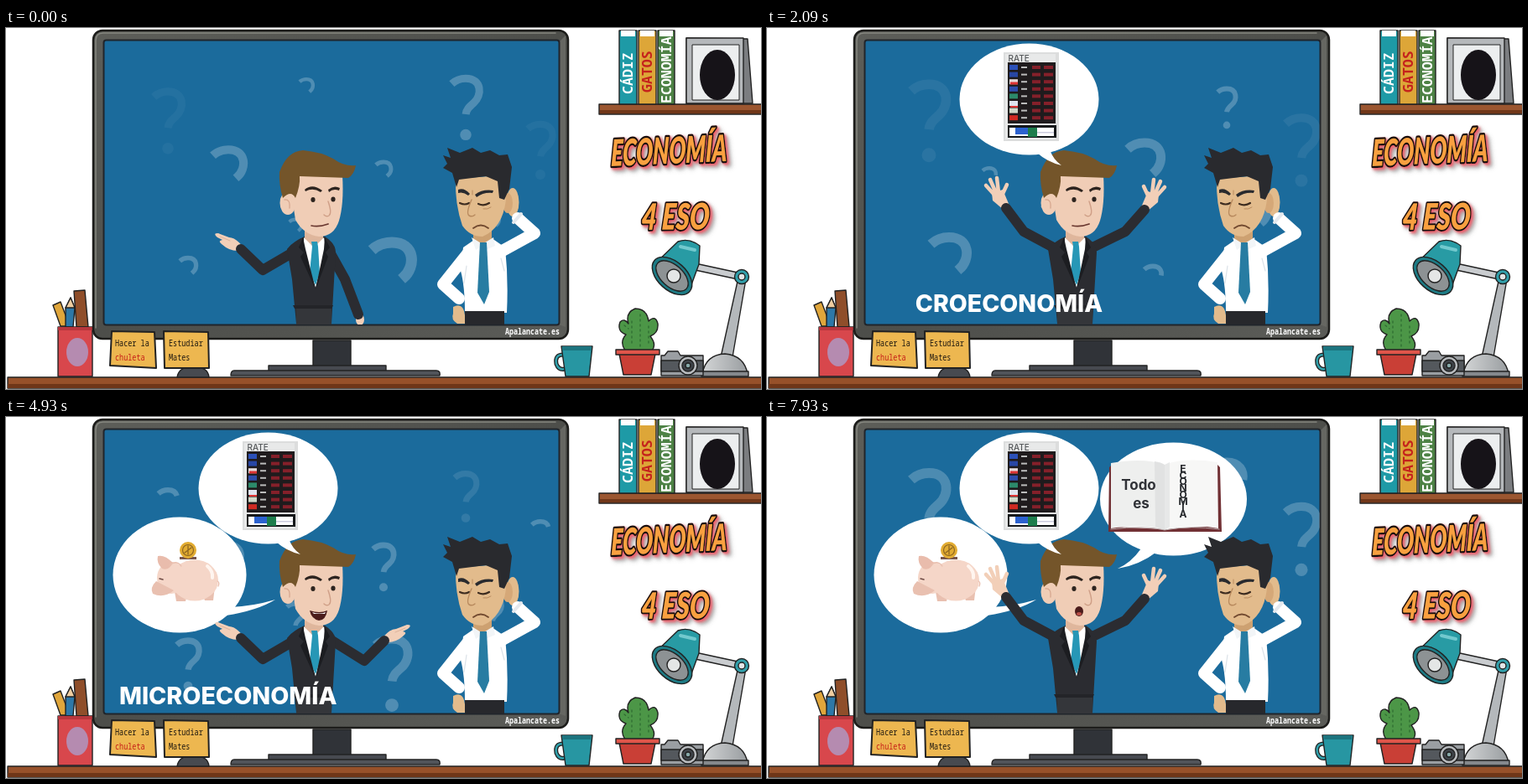
Write an HTML page that moves like this. It is 900 by 431 pixels and loops after 8000 ms.

```html
<!DOCTYPE html>
<html lang="es">
<head>
<meta charset="utf-8">
<title>Economía 4 ESO</title>
<style>
html, body { margin: 0; width: 100%; height: 100%; overflow: hidden; background: #fff; }
svg { display: block; width: 100%; height: 100%; }
.mono { font-family: "Noto Sans Mono", "DejaVu Sans Mono", monospace; }
.sans { font-family: Inter, "Open Sans", sans-serif; font-weight: 700; }
.logo { font: italic 900 26.5px Lato, sans-serif; fill: #f9a03f; stroke: #17110d; stroke-width: 2.8; paint-order: stroke; stroke-linejoin: round; }
.logo.big { font-size: 31px; }
.ink { stroke: #222; stroke-width: 1.4; stroke-linejoin: round; }
.ink.thick { stroke-width: 2; }
.line { fill: none; stroke-linecap: round; stroke-linejoin: round; }
</style>
</head>
<body>
<svg viewBox="0 0 900 431" preserveAspectRatio="none">
<defs>
  <linearGradient id="bezel" x2="1" y2="1"><stop stop-color="#5d5e59"/><stop offset=".5" stop-color="#4d4e4a"/><stop offset="1" stop-color="#5b5c58"/></linearGradient>
  <linearGradient id="metal" x2="1"><stop stop-color="#d3d5d6"/><stop offset="1" stop-color="#999da0"/></linearGradient>
  <filter id="glow" x="-20%" y="-40%" width="150%" height="200%"><feDropShadow dx="2" dy="2" stdDeviation="1.5" flood-color="#ef5e6c"/><feDropShadow dx="3" dy="3" stdDeviation="2" flood-color="#555" flood-opacity=".55"/></filter>
  <clipPath id="view"><rect x="118" y="16" width="541" height="338"/></clipPath>
</defs>
<rect width="900" height="431" fill="#fff"/>

<!-- shelf -->
<g class="ink">
  <path d="M707 91H902V103H707Z" fill="#9b5630"/><path d="M708 98H900V102H708Z" fill="#713719" stroke="none"/>
  <path d="M731 3H752V91H731Z" fill="#1e9aa6"/><path d="M754 3H775V91H754Z" fill="#dda638"/><path d="M777 3H797V91H777Z" fill="#4d8245"/>
  <path d="M733 3H750V10H733ZM756 3H773V10H756ZM779 3H795V10H779Z" fill="#fff" stroke="none"/>
  <path d="M811 12L884 13L890 90H811Z" fill="#7b7d80"/>
  <path d="M811 12H879V90H811Z" fill="#b5b8bb"/><path d="M818 20H874V86H818Z" fill="#eceeef" stroke-width="1"/>
</g>
<ellipse cx="848" cy="56" rx="21" ry="30" fill="#161318"/>
<g class="mono" font-size="16.6" font-weight="600">
  <text transform="translate(747 79) rotate(-90)" fill="#fff">CÁDIZ</text>
  <text transform="translate(770 77) rotate(-90)" fill="#c5221c">GATOS</text>
  <text transform="translate(793 90) rotate(-90)" fill="#fff">ECONOMÍA</text>
</g>
<g filter="url(#glow)">
  <text class="logo" transform="translate(721 165) rotate(-2.5) skewX(-4) scale(1 1.65)">ECONOMÍA</text>
  <text class="logo big" transform="translate(757 241) rotate(-.5) skewX(-4) scale(1 1.4)">4 ESO</text>
</g>

<!-- desk -->
<g class="ink">
  <path d="M2 417H902V430H2Z" fill="#97512a"/><path d="M2 425H900V430H2Z" fill="#6f3618" stroke="none"/>
  <path d="M366 373H411V405H366Z" fill="#303338"/>
  <path d="M313 403H453V410H313Z" fill="#474a50"/><path d="M272 409H513Q518 409 517 415H268Q268 409 272 409Z" fill="#51545a"/>
  <path d="M204 417Q206 404 224 404Q241 405 242 417Z" fill="#474a50"/>
</g>

<!-- pencils -->
<g class="ink">
  <path d="M56 331L65 327L76 356H65Z" fill="#e0a63b"/><path d="M71 334L77 322L82 334L80 357H71Z" fill="#2d78a8"/><path d="M71 334L77 322L82 334Z" fill="#efcda0"/>
  <path d="M81 314L94 313L98 357H84Z" fill="#8f4e2a"/>
  <path d="M62 357H103V416H62Z" fill="#d8474c"/><path d="M62 357H103V361H62Z" fill="#b8373d" stroke="none"/>
</g>
<ellipse cx="85" cy="387" rx="13" ry="17" fill="#b58bb0"/>

<!-- lamp -->
<g class="ink">
  <path d="M817 280L877 293V301L817 288Z" fill="#c9cccf"/><path d="M873 298L882 300L866 393H852Z" fill="#b4b8bb"/>
  <circle cx="877" cy="297" r="8.5" fill="#31a0ab"/><circle cx="877" cy="297" r="4" fill="#e4e7e8"/>
  <path d="M830 413Q834 390 857 389Q880 391 884 413Z" fill="url(#metal)"/><path d="M829 410H885V416H829Z" fill="#85898d"/>
  <path d="M771 284L801 255Q814 250 827 260L826 282L815 312L806 318Z" fill="#289ba4"/>
  <ellipse cx="794" cy="296" rx="17" ry="28" transform="rotate(-48 794 296)" fill="#1d7b85"/>
  <ellipse cx="794" cy="296" rx="13" ry="23" transform="rotate(-48 794 296)" fill="#8d9294"/>
  <circle cx="796" cy="296" r="8" fill="#e4e6e6"/>
</g>
<path class="line" d="M804 261L821 265" stroke="#72c9ce" stroke-width="4"/>

<!-- cactus, camera, mug -->
<g class="ink">
  <path d="M738 385Q731 375 739 366Q728 362 732 351Q737 346 742 353Q738 340 750 335Q764 335 766 350Q774 342 777 353Q778 364 768 368Q776 378 770 385Z" fill="#4c9647"/>
  <path d="M731 389H774L769 414H736Z" fill="#c93f36"/><path d="M727 384H779V390H727Z" fill="#df554a"/>
  <path d="M785 391L789 386H801L804 391H831V415H781V391Z" fill="#9a9ea2"/><path d="M781 397H831V410H781Z" fill="#54585d"/>
  <circle cx="813" cy="403" r="11" fill="#babdc0"/><circle cx="813" cy="403" r="7" fill="#3f444a"/><circle cx="813" cy="403" r="3" fill="#8aa"/>
  <path class="line" d="M664 390Q654 390 656 401Q659 409 666 407" stroke="#222" stroke-width="5"/>
  <path class="line" d="M664 390Q654 390 656 401Q659 409 666 407" stroke="#31a0ab" stroke-width="2.5"/>
  <path d="M662 380H699L695 416H667Z" fill="#2796a2"/><path d="M663 380H698L697 385H664Z" fill="#1c737e" stroke="none"/>
</g>
<path class="line" d="M746 350V376M756 342V380M766 356V378M737 355L742 359" stroke="#2f6c32" stroke-width="1.3" stroke-dasharray="2 4"/>

<!-- monitor -->
<rect x="104" y="3" width="566" height="368" rx="11" fill="url(#bezel)" stroke="#1c1c1a" stroke-width="2.5"/>
<path class="line" d="M107 358V15Q107 6 116 6H655" stroke="#85867f" stroke-width="1.5"/>
<path d="M659 17L667 9V357L659 354Z" fill="#666762"/>
<rect x="116.500" y="14.500" width="543" height="340" rx="3" fill="#1b6b9c" stroke="#20252b" stroke-width="2"/>
<g id="screen" clip-path="url(#view)"></g>
<text class="mono" transform="translate(595 366) scale(1 1.25)" font-size="8.35" font-weight="700" fill="#fff">Apalancate.es</text>
<g class="ink thick">
  <path d="M126 362L177 363L179 406L124 403Z" fill="#edb750"/><path d="M188 362L241 363L242 406L189 406Z" fill="#edb750"/>
</g>
<g class="mono" font-size="8.5" fill="#1d1710">
  <text transform="translate(130 380) scale(1 1.3)">Hacer la</text><text transform="translate(130 397) scale(1 1.3)" fill="#c61d17">chuleta</text>
  <text transform="translate(194 380) scale(1 1.3)">Estudiar</text><text transform="translate(194 397) scale(1 1.3)">Mates</text>
</g>
</svg>
<script>
const FPS = 12, LOOP = 8000;
const screen = document.getElementById("screen");
const clamp = v => Math.max(0, Math.min(1, v));
const mod = (a, n) => ((a % n) + n) % n;
const smooth = v => v * v * (3 - 2 * v);
const fill = (d, c) => `<path d="${d}" fill="${c}"/>`;
const stroke = (d, c, w) => `<path class="line" d="${d}" stroke="${c}" stroke-width="${w}"/>`;
const rect = (x, y, w, h, c) => `<rect x="${x}" y="${y}" width="${w}" height="${h}" fill="${c}"/>`;
const oval = (x, y, rx, ry, c) => `<ellipse cx="${x}" cy="${y}" rx="${rx}" ry="${ry}" fill="${c}"/>`;

// Question marks: x, y, largest width, start step.
// Each shows twice per cycle: once shrinking from full size, once growing from small.
const CYCLE = 51, SECOND = 26, LIFE = 22;
const MARKS = [
  [193, 111, 70, 30.5], [637, 146, 62, 30.5], [548, 95, 50, 41],
  [265, 184, 48, 47], [460, 306, 62, 47], [217, 295, 56, 21],
  [450, 179, 52, 21], [358, 78, 46, 21], [345, 244, 42, 21], [580, 238, 46, 21]
];

function mark(x, y, w, drawn, alpha) {
  const dot = drawn >= 1 ? '<circle cy=".82" r=".17" fill="#fff"/>' : "";
  return `<g transform="translate(${x} ${y}) scale(${w})" opacity="${alpha * .23}">
    <path d="M-.42 -.72C-.3 -.83 -.14 -.88 0 -.88C.5 -.88 .5 -.36 .24 -.14C.08 0 0 .08 0 .26V.5" pathLength="1" fill="none" stroke="#fff" stroke-width=".23" stroke-dasharray="${drawn} 2"/>${dot}</g>`;
}

function marks(k) {
  let out = "";
  for (const [x, y, size, start] of MARKS) for (let i = 0; i < 2; i++) {
    const p = mod(k - start - i * SECOND, CYCLE);
    if (p >= LIFE) continue;
    const w = size * (i ? .34 + .019 * p : 1 - .021 * p);
    out += mark(x, y, w, clamp(p / 5), clamp((LIFE - p) / 9));
  }
  return out;
}

// Pops a speech bubble out of the tip of its tail, with a slight overshoot
function pop(t, start, x, y, body) {
  if (t < start) return "";
  const q = clamp(t - start) - 1;
  const s = 1 + 1.9 * q * q * q + .9 * q * q;
  return `<g transform="translate(${x} ${y}) scale(${s}) translate(${-x} ${-y})">${body}</g>`;
}

function board() {
  const flags = ["#2b50b8", "#2846a5", "#e4dada", "#2f4cab", "#2c8a6a", "#dfe3ee", "#cfd8c8", "#cf2a22"];
  let out = oval(312.5, 85, 83, 66.5, "#fff") + fill("M322 149Q334 160 351 164Q341 157 337 145Z", "#fff")
    + rect(282, 29, 66, 106, "#dcdddd") + rect(284, 31, 60, 102, "#e8e9e9")
    + '<text class="sans" x="287.500" y="39.500" font-size="10" style="font-weight:500" fill="#55585a">RATE</text>'
    + rect(287, 41, 57, 73, "#1f1b1d") + rect(287, 116, 58, 15, "#15181a");
  flags.forEach((c, i) => {
    const y = 44 + i * 8.6;
    out += rect(289, y, 10, 6, c) + rect(303, y + 2, 7, 2, "#bbb")
      + rect(316, y + 1, 10, 4, "#85202a") + rect(330, y + 1, 11, 4, "#85202a");
  });
  return out + rect(290, 64.5, 9, 3, "#d33") + rect(290, 93, 9, 2, "#d33") + rect(289, 119, 53, 10, "#fff")
    + rect(296, 119, 15, 8, "#2c62cf") + rect(311, 119, 11, 11, "#1d7d4c") + rect(322, 124, 20, 1.5, "#ccd");
}

function piggy() {
  const skin = "#f5d6c8", shade = "#e9c0b0";
  return oval(207, 188.5, 79.5, 69, "#fff") + fill("M268 227Q294 226 321 218Q300 231 262 237Z", "#fff")
    + fill("M200 203L203 220H214L216 212H234L237 219H247L249 202Z", shade)
    + oval(225, 195, 28, 24.5, skin) + oval(197, 192, 17, 19, skin)
    + fill("M179 196Q171 204 175 211Q188 217 200 207Z", shade)
    + fill("M181 166Q189 164 199 174Q194 184 186 181Q179 174 181 166Z", "#e9bcac")
    + stroke("M195 177Q203 170 209 178M252 196Q255 197 253 202", shade, 1.3)
    + stroke("M240 178Q247 184 246 192", "#fff5ef", 4) + stroke("M183 193l4 1", "#6d4943", 1.5)
    + rect(207, 167, 20, 3, "#77554b") + oval(217, 159, 10, 10, "#e2ac32")
    + '<circle cx="217" cy="159" r="6.500" fill="none" stroke="#8d6520" stroke-width="1.2"/>'
    + stroke("M213 162L221 156M217 154V164", "#8d6520", 1.3);
}

function book(t) {
  const open = smooth(clamp((t - 6.4) / .45));
  let out = oval(484.5, 98, 87.5, 67.5, "#fff") + fill("M446 157Q434 174 418 181Q444 177 466 160Z", "#fff");
  out += `<g transform="translate(474 0) scale(${open} 1) translate(-474 0)">`
    + fill("M408 60L411 57V131L474 134V137H407Z", "#713034") + fill("M410 55Q450 48 474 57V135Q445 126 410 133Z", "#eeefee")
    + fill("M462 53Q470 54 474 57V135L463 131Z", "#e1e2e2") + "</g>"
    + fill("M540 60L537 57V130L474 134V137H542Z", "#713034") + fill("M474 57Q498 48 537 54L538 133Q505 126 474 135Z", "#f7f7f6")
    + fill("M474 57L480 54V131L474 135Z", "#e7e8e8") + stroke("M410 134Q450 129 474 135Q505 129 539 134", "#b8aaaa", 1);
  if (t >= 7.3) out += '<g class="sans" font-size="17" fill="#303237" text-anchor="middle"><text x="443" y="87">Todo</text>'
    + (t >= 7.4 ? '<text x="446" y="109">es</text>' : "") + "</g>";
  const n = Math.floor((t - 7.25) * FPS) + 1;
  [..."ECONOMÍA"].slice(0, Math.max(0, n)).forEach((c, i) => {
    out += `<text class="sans" x="496" y="${66 + i * 7.7}" font-size="12" text-anchor="middle" fill="#25272b">${c}</text>`;
  });
  return out;
}

// Elbow and wrist of each arm: left x, y, x, y, then right
const POINT = [306, 289, 280, 264, 404, 300, 420, 342];
const SHRUG = [306, 289, 280, 264, 427, 291, 451, 267];
const CHEER = [306, 243, 285, 215, 427, 243, 450, 217];
const MOVES = [[.7, .3, SHRUG], [1.65, .35, CHEER], [4.4, .35, SHRUG], [5.4, .35, CHEER]];

function armsAt(t) {
  let pose = POINT;
  for (const [start, time, next] of MOVES) {
    const p = smooth(clamp((t - start) / time));
    pose = pose.map((v, i) => v + (next[i] - v) * p);
  }
  return pose;
}

function hand(x, y, side) {
  const skin = "#f2cfb8";
  let body;
  if (y > 305) body = oval(2, 6, 5, 7, skin);
  else if (y < 240) body = fill("M-3 2L4 -3L-4 -22L-17 -18L-16 -9Z", skin)
    + stroke("M-14 -16L-24 -27M-12 -18L-19 -34M-9 -19L-11 -36M-5 -15L1 -28", skin, 4.5);
  else body = fill("M3 -2Q-6 -14 -14 -14L-27 -19Q-34 -19 -28 -14L-22 -11Q-28 -10 -23 -6Q-13 3 -2 2Z", skin)
    + stroke("M-13 -10L-25 -15", "#d6ab93", .8);
  return `<g transform="translate(${x} ${y}) scale(${side} 1)">${body}</g>`;
}

const MOUTHS = {
  c: stroke("M364 236Q373 238 384 234", "#69372f", 1.7),
  m: fill("M362 231Q374 235 383 231Q381 243 373 243Q364 241 362 231Z", "#4b1c1b") + fill("M365 233Q374 236 381 233L380 235H367Z", "#fff"),
  b: fill("M363 228Q373 232 382 228Q381 243 373 244Q365 241 363 228Z", "#4b1c1b") + fill("M365 230Q373 233 380 230L379 232H367Z", "#fff") + oval(373, 241, 4, 2.5, "#c6564b"),
  o: oval(372, 232, 5, 6, "#4b1c1b") + oval(372, 235, 3, 2, "#b84e46")
};
const TALK = "cbmcbmocmcbmbcmo";

function speaker(k, t) {
  const [a, b, c, d, e, f, g, h] = armsAt(t);
  const suit = "#2b2c31", skin = "#f0cdb6", hair = "#74552a", dark = "#2d241f";
  return hand(c, d, 1) + hand(g, h, h > 305 ? 1 : -1)
    + stroke(`M347 265L${a} ${b}L${c} ${d}M384 264L${e} ${f}L${g} ${h}`, suit, 12)
    + fill("M335 264Q343 254 356 249H380Q393 257 393 268L388 353H346L341 300Z", suit)
    + rect(346, 334, 42, 20, "#34363a") + fill("M342 331L390 331L388 335H344Z", "#232428")
    + fill("M356 238H378V256L367 267L356 256Z", "#dfb69c")
    + fill("M355 250L367 262L379 250L381 262L369 310L355 265Z", "#fff")
    + fill("M364 255L371 255L372 261L374 292L369 307L362 292L365 261Z", "#2797b6")
    + fill("M354 250L349 262L355 268L351 273L369 312L357 264ZM380 250L386 262L381 268L384 273L369 312L379 264Z", "#1c1d21")
    + oval(336, 209, 9.5, 14, skin) + stroke("M332 205Q339 204 338 215", "#d6a78f", 1.3)
    + fill("M345 176H401Q403 210 397 230Q391 249 373 249Q355 247 345 229Q340 205 345 176Z", skin)
    + fill("M330 203Q325 186 326 172Q335 147 354 146Q376 148 390 156Q404 166 417 164Q415 175 408 179L350 177Q351 188 345 203Q340 193 330 203Z", hair)
    + fill("M356 193Q365 185 377 194L375 196Q366 190 357 195ZM384 193Q391 187 398 191L397 194Q390 191 385 196Z", dark)
    + oval(366, 205, 2.6, 3, dark) + oval(390, 204.5, 2.6, 3, dark)
    + stroke("M384 207Q389 221 385 224Q382 226 379 223", "#cf9f87", 1.4) + MOUTHS[TALK[k % TALK.length]];
}

function listener() {
  const skin = "#e2bb8c", dark = "#292a2e";
  return oval(604, 208, 7.5, 17, skin) + oval(598, 209, 6, 12, "#d5a878")
    + stroke("M588 268L630 245L610 227", "#fff", 14) + stroke("M605 232L614 222", "#e5e9ee", 4)
    + fill("M533 333Q543 328 546 338L549 353H538Q530 348 533 341Z", skin)
    + stroke("M552 267L521 306L540 323", "#fff", 14)
    + fill("M545 262L558 253H582L595 262Q599 300 597 340H547Q547 308 542 290Z", "#fff")
    + stroke("M549 284L546 305M590 275L594 290", "#dbe2e8", 1.2) + rect(547, 338, 47, 16, "#27282c")
    + fill("M557 238H579V254L569 263L557 254Z", "#cda171")
    + fill("M555 250L568 258L581 250L583 260L574 264L568 259L560 265Z", "#f2f5f7")
    + fill("M565 256H573L576 315L570 330L562 316Z", "#277ca2")
    + fill("M536 180L590 176L596 205Q592 239 568 249Q553 249 544 236Q535 210 536 180Z", skin)
    + fill("M521 167L526 162L521 152L530 155L526 143L541 149L556 143L566 149L577 146L588 152L598 151L603 166L600 192L594 205L588 203L586 183L572 177L540 181L537 190L532 173Z", dark)
    + fill("M539 193Q546 190 553 198L551 200Q545 195 539 197ZM559 199Q568 192 581 194L580 197Q569 196 561 202Z", dark)
    + stroke("M541 209Q547 212 552 209M563 210Q570 213 576 209", "#3d2c20", 2.2)
    + stroke("M555 205Q548 221 552 224Q556 226 559 223", "#b88a5e", 1.4)
    + stroke("M557 239Q566 232 575 239", "#71492f", 1.8) + stroke("M556 194V199M578 214Q574 217 569 216", "#b88a5e", 1);
}

// Letters come and go one by one from the left, while the line grows slowly
function title(t, word, y, from, to) {
  const shown = clamp((t - from) / .6) * word.length, gone = clamp((t - to) / .9) * word.length;
  if (t < from || gone >= word.length) return "";
  const a = Math.floor(gone), b = Math.floor(shown);
  const size = 28.1 * (1 + .009 * (t - from));
  const span = (s, o) => s && `<tspan fill-opacity="${o}">${s}</tspan>`;
  return `<text class="sans" x="264.700" y="${y}" font-size="${size}" style="font-weight:800" text-anchor="middle" fill="#fff">`
    + span(word.slice(0, a), 0) + span(word.slice(a, b), 1) + span(word.slice(b), 0) + "</text>";
}

function render(ms) {
  const k = Math.floor(ms * FPS / 1000), t = k / FPS;
  screen.innerHTML = marks(k)
    + pop(t, 2.65, 321, 218, piggy())
    + pop(t, 6.15, 418, 181, book(t))
    + speaker(k, t)
    + pop(t, .05, 351, 164, board())
    + listener()
    + title(t, "MACROECONOMÍA", 338.5, .6, 1.92)
    + title(t, "MICROECONOMÍA", 342.5, 2.9, 5.05);
}

function tick() {
  render(performance.now() % LOOP);
  requestAnimationFrame(tick);
}
tick();
</script>
</body>
</html>
```
